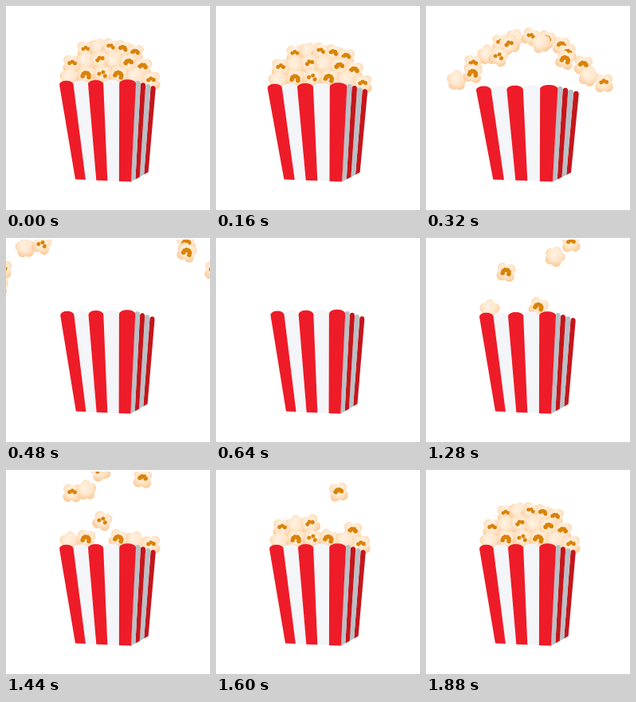
These frames come from a looping animation (256 px wide and 256 px high, 1.92 s). An HTML page with a canvas:

```html
<!DOCTYPE html>
<html lang="en">
<head>
<meta charset="utf-8">
<title>Popcorn</title>
<style>
html, body { margin: 0; width: 100%; height: 100%; overflow: hidden; background: #fff; }
canvas { display: block; width: 100vw; height: 100vh; }
</style>
</head>
<body>
<canvas id="stage"></canvas>
<script>
const LOOP = 1920, STEP = 40;
const LAUNCH = 240, FLIGHT = 320, GONE = 1000, PEAK = 280, SETTLED = 960;
const BURST_SPEED = 0.45, FALL_SPEED = 0.55;
const ORIGIN = { x: 130, y: 110 }, BASE = { x: 128, y: 220 };
const RED = '#ed1c28', WHITE = '#f4f5f8', GREY = '#b9c0c6', DARK = '#c5161c';

const canvas = document.getElementById('stage');
const ctx = canvas.getContext('2d');

const lerp = (a, b, u) => a + (b - a) * u;
const clamp = u => Math.max(0, Math.min(1, u));
const smooth = u => u * u * (3 - 2 * u);

// Caramel marks: dots along an arc.
const MARKS = {
  a: { dots: 6, sweep: 3.5, r: 3 },
  h: { dots: 4, sweep: 2.3, r: 3 },
  b: { dots: 3, sweep: 2, r: 2.7 },
  d: { dots: 3, sweep: 3, r: 2.6 }
};

// Curved rows, back to front. Each digit of order is a landing slot.
const ROWS = [
  { x: 100, gap: 15.5, y: 52, curve: 5, size: 0.88, spread: 1.05, marks: 'b bhh', land: 1720, order: '21034' },
  { x: 83, gap: 17.7, y: 68, curve: 7, size: 0.95, spread: 1.5, marks: 'b b hh', land: 1520, order: '001641' },
  { x: 80, gap: 20.4, y: 86, curve: 6, size: 0.95, spread: 2.2, marks: ' ada b', land: 1240, order: '036145' }
];

const kernels = ROWS.flatMap((row, n) => [...row.marks].map((mark, i) => {
  const c = 2 * i / (row.marks.length - 1) - 1;
  const x = row.x + row.gap * i, y = row.y + row.curve * c * c + 2 * c;
  const dx = (x - ORIGIN.x) * row.spread, dy = y - ORIGIN.y;
  return {
    x, y, mark: MARKS[mark], size: row.size,
    turn: 0.4 * Math.sin(7 * i + 3 * n),
    angle: Math.atan2(dy, dx),
    reach: 48 + 0.4 * Math.hypot(dx, dy),
    land: row.land + row.order[i] * STEP
  };
}));

// Positive is wide and low; springs back after the peak.
function squashAt(t) {
  if (t < PEAK) return 0.08 * smooth(clamp((t - 40) / (PEAK - 40)));
  const fade = clamp((SETTLED - t) / (SETTLED - PEAK)) ** 1.5;
  return 0.08 * fade * Math.cos((t - PEAK) / 100);
}

function place(k, t, sx, sy) {
  if (t >= GONE) return [k.x, k.y - Math.max(0, k.land - t) * FALL_SPEED];
  const dist = k.reach + Math.max(0, t - FLIGHT) * BURST_SPEED;
  const u = clamp((t - LAUNCH) / (FLIGHT - LAUNCH));
  return [
    lerp(BASE.x + (k.x - BASE.x) * sx, ORIGIN.x + dist * Math.cos(k.angle), u),
    lerp(BASE.y + (k.y - BASE.y) * sy, ORIGIN.y + dist * Math.sin(k.angle), u)
  ];
}

// Circles spaced evenly over a sweep of a ring, centred on the top.
function ring(count, sweep, radius, r) {
  ctx.beginPath();
  for (let i = 0; i < count; i++) {
    const a = -Math.PI / 2 + sweep * (i / (count - 1) - 0.5);
    const x = radius * Math.cos(a), y = radius * Math.sin(a);
    ctx.moveTo(x + r, y);
    ctx.arc(x, y, r, 0, Math.PI * 2);
  }
  ctx.fill();
}

function drawKernel(k, x, y) {
  ctx.save();
  ctx.translate(x, y);
  ctx.scale(k.size, k.size);
  const shade = ctx.createRadialGradient(-3, -3, 2, -2, -2, 16);
  shade.addColorStop(0, '#fff0df');
  shade.addColorStop(0.5, '#fee6cb');
  shade.addColorStop(1, '#fbc996');
  ctx.fillStyle = shade;
  ctx.rotate(k.turn);
  const lobes = k.mark ? 4 : 5;
  ctx.save();
  ctx.rotate(Math.PI / 4);
  ring(lobes + 1, Math.PI * 2, 7, k.mark ? 6.9 : 6.7);
  ctx.restore();
  ring(2, 0, 0, 7);
  if (k.mark) {
    ctx.fillStyle = '#d98308';
    ctx.translate(0, 1);
    ring(k.mark.dots, k.mark.sweep, 4.2, k.mark.r);
  }
  ctx.restore();
}

// A tapering stripe with a rounded top.
function stripe(top, foot, rise, colour) {
  const [a, b] = top, [c, d] = foot;
  ctx.fillStyle = colour;
  ctx.beginPath();
  ctx.ellipse((a.x + b.x) / 2, (a.y + b.y) / 2, (b.x - a.x) / 2, rise, 0, Math.PI, Math.PI * 2);
  ctx.lineTo(d.x, d.y);
  ctx.lineTo(c.x, c.y);
  ctx.fill();
}

function drawBox(sx, sy) {
  const frontTop = i => ({ x: 67 + 17.2 * i + 0.4 * i * i, y: 99 - 0.4 * i });
  const frontFoot = i => ({ x: 87 + 12.6 * i + 0.28 * i * i, y: 217.5 + 0.6 * i });
  const sideTop = i => ({ x: 162.5 + 6.3 * i, y: 97 + 2.1 * i });
  const sideFoot = i => ({ x: 157 + 5.4 * i, y: 220.5 - 3 * i });
  const pair = (f, i) => [f(i), f(i + 1)];

  ctx.save();
  ctx.translate(BASE.x, BASE.y);
  ctx.scale(sx, sy);
  ctx.translate(-BASE.x, -BASE.y);
  for (let i = 3; i >= 0; i--) {
    stripe(pair(sideTop, i), pair(sideFoot, i), 4, i % 2 ? DARK : GREY);
  }
  for (const i of [1, 3, 0, 2, 4]) {
    stripe(pair(frontTop, i), pair(frontFoot, i), 5, i % 2 ? WHITE : RED);
  }
  ctx.restore();
}

function draw(t) {
  const ratio = window.devicePixelRatio || 1;
  const w = Math.round(innerWidth * ratio), h = Math.round(innerHeight * ratio);
  if (canvas.width !== w || canvas.height !== h) {
    canvas.width = w;
    canvas.height = h;
  }
  ctx.setTransform(w / 256, 0, 0, h / 256, 0, 0);
  ctx.fillStyle = '#fff';
  ctx.fillRect(0, 0, 256, 256);
  const a = squashAt(t), sx = 1 + a, sy = 1 - 0.8 * a;
  ctx.save();
  ctx.beginPath();
  ctx.rect(0, 2, 256, 254);
  ctx.clip();
  for (const k of kernels) drawKernel(k, ...place(k, t, sx, sy));
  drawBox(sx, sy);
  ctx.restore();
}

const start = performance.now();
function tick() {
  const t = (performance.now() - start) % LOOP;
  draw(Math.floor(t / STEP) * STEP);
  requestAnimationFrame(tick);
}
tick();
</script>
</body>
</html>
```
